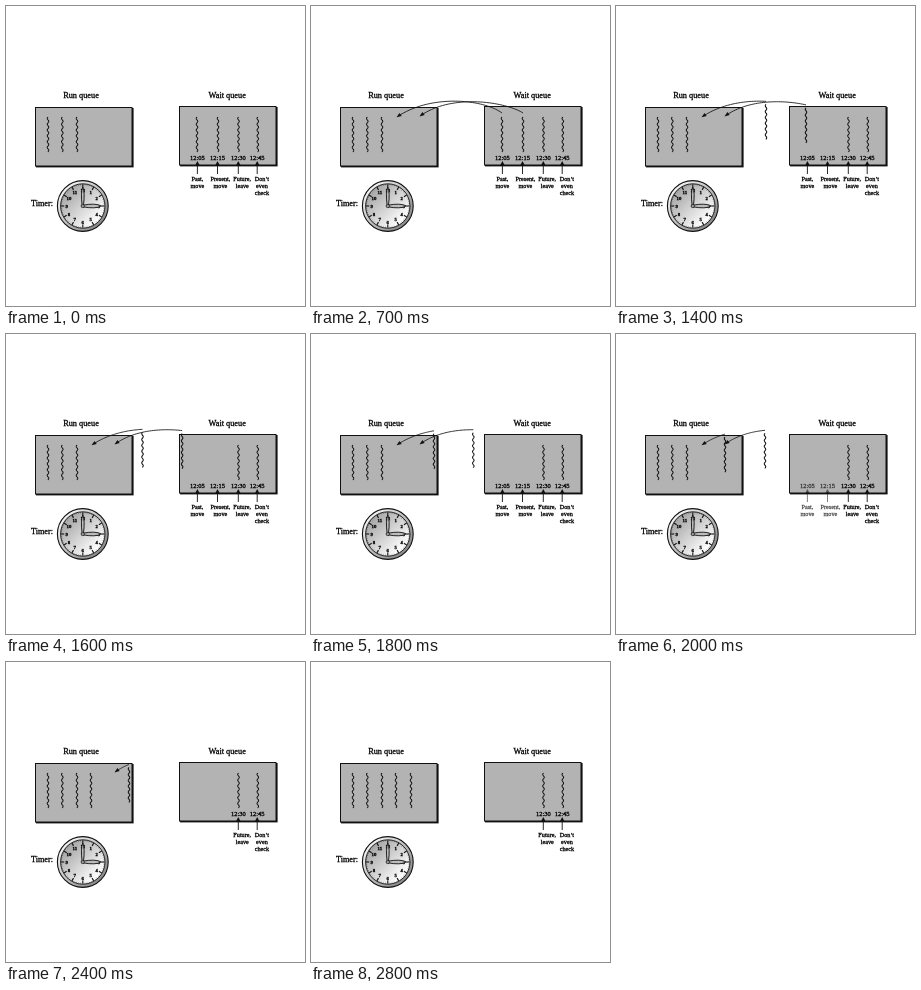
Write an HTML page with a canvas that moves like this. It is 299x300 px and loops after 3.4 s.

```html
<!DOCTYPE html>
<html lang="en">
<head>
<meta charset="utf-8">
<title>Run queue and wait queue</title>
<style>
html, body { margin: 0; width: 100%; height: 100%; overflow: hidden; background: #fff; }
canvas { display: block; width: 100vw; height: 100vh; }
</style>
</head>
<body>
<canvas id="stage" width="299" height="300"></canvas>
<script>
const ctx = document.getElementById('stage').getContext('2d');
const LOOP = 3400, START = 700, STEP = 100, LAST_STEP = 22;
const INK = '#111', REST_TOP = 111, THREAD_LENGTH = 35;

// Each key pairs a step with the thread's x position.
const movers = [
  {
    path: [[191, 107], [172, 93], [119, 88], [85.5, 111.3]],
    keys: [[1, 191], [4, 172.7], [8, 150], [12, 123], [14, 109], [18, 85]]
  },
  {
    path: [[212, 107], [195, 96], [140, 87], [108.5, 110.5]],
    keys: [[4, 212], [6, 203], [8, 190], [12, 162.3], [14, 149], [18, 123], [22, 100]]
  }
];

const slots = [
  { x: 191.4, labelX: 191.4, time: '12:05', lines: ['Past,', 'move'], fades: true },
  { x: 211.5, labelX: 214.4, time: '12:15', lines: ['Present,', 'move'], fades: true },
  { x: 232.3, labelX: 236.2, time: '12:30', lines: ['Future,', 'leave'] },
  { x: 251.2, labelX: 255.9, time: '12:45', lines: ['Don\u2019t', 'even', 'check'] }
];

const clamp01 = v => Math.max(0, Math.min(1, v));

function keyed(keys, step) {
  if (step <= keys[0][0]) return keys[0][1];
  for (let i = 1; i < keys.length; i++) {
    const [s0, x0] = keys[i - 1], [s1, x1] = keys[i];
    if (step <= s1) return x0 + (x1 - x0) * (step - s0) / (s1 - s0);
  }
  return keys[keys.length - 1][1];
}

function bezier(p, u) {
  const v = 1 - u;
  return [0, 1].map(i => v * v * v * p[0][i] + 3 * v * v * u * p[1][i] +
    3 * v * u * u * p[2][i] + u * u * u * p[3][i]);
}

// The paths run right to left, so x falls steadily along them.
function paramAtX(path, x) {
  let lo = 0, hi = 1;
  for (let i = 0; i < 24; i++) {
    const mid = (lo + hi) / 2;
    if (bezier(path, mid)[0] > x) lo = mid; else hi = mid;
  }
  return (lo + hi) / 2;
}

function text(str, x, y, size, weight = '') {
  ctx.font = `${weight} ${size}px "Liberation Serif", Times, serif`;
  ctx.textAlign = 'center';
  ctx.fillStyle = ctx.strokeStyle = '#000';
  ctx.lineWidth = 0.28;
  ctx.fillText(str, x, y);
  ctx.strokeText(str, x, y);
}

function line(x0, y0, x1, y1, width, color = INK) {
  ctx.strokeStyle = color;
  ctx.lineWidth = width;
  ctx.beginPath();
  ctx.moveTo(x0, y0);
  ctx.lineTo(x1, y1);
  ctx.stroke();
}

function disc(x, y, r, fill, width) {
  ctx.beginPath();
  ctx.arc(x, y, r, 0, Math.PI * 2);
  ctx.fillStyle = fill;
  ctx.fill();
  ctx.strokeStyle = INK;
  ctx.lineWidth = width;
  ctx.stroke();
}

function diagonal(x, y, r, from, to) {
  const g = ctx.createLinearGradient(x - r, y - r, x + r, y + r);
  g.addColorStop(0, from);
  g.addColorStop(1, to);
  return g;
}

function arrowHead(x, y, angle, length, half) {
  ctx.save();
  ctx.translate(x, y);
  ctx.rotate(angle);
  ctx.fillStyle = INK;
  ctx.beginPath();
  ctx.moveTo(0, 0);
  ctx.lineTo(-length, -half);
  ctx.lineTo(-length, half);
  ctx.fill();
  ctx.restore();
}

function thread(x, top = REST_TOP) {
  ctx.strokeStyle = INK;
  ctx.lineWidth = 1.05;
  ctx.beginPath();
  for (let d = 0; d <= THREAD_LENGTH; d += 0.5) {
    ctx.lineTo(x - Math.sin(d * Math.PI * 2 / 5.8) * 0.75, top + d);
  }
  ctx.stroke();
}

function queue(title, titleX, x, y) {
  text(title, titleX, 92.3, 8.3);
  ctx.fillStyle = INK;
  ctx.fillRect(x + 1, y + 1, 97.6, 59.4);
  ctx.fillStyle = '#b3b3b3';
  ctx.fillRect(x, y, 97, 59);
  ctx.strokeStyle = INK;
  ctx.lineWidth = 1;
  ctx.strokeRect(x + 0.5, y + 0.5, 96.5, 58.5);
}

function hand(x, y, angle, length, half) {
  ctx.save();
  ctx.translate(x, y);
  ctx.rotate(angle);
  ctx.beginPath();
  ctx.moveTo(0, -half * 0.5);
  ctx.quadraticCurveTo(length * 0.7, -half * 2, length, 0);
  ctx.quadraticCurveTo(length * 0.7, half * 2, 0, half * 0.5);
  ctx.closePath();
  ctx.fillStyle = '#bbb';
  ctx.fill();
  ctx.strokeStyle = INK;
  ctx.lineWidth = 0.9;
  ctx.stroke();
  ctx.restore();
}

function clock(x, y) {
  text('Timer:', 36, 200.3, 8.2);
  disc(x, y, 25.4, diagonal(x, y, 18, '#f4f4f4', '#888'), 1.1);
  disc(x, y, 22.2, diagonal(x, y, 15, '#a8a8a8', '#fff'), 0.9);
  for (let i = 0; i < 60; i++) {
    const a = i * Math.PI / 30, c = Math.cos(a), s = Math.sin(a);
    const inner = i % 5 ? 20.8 : 18.6;
    line(x + c * inner, y + s * inner, x + c * 21.8, y + s * 21.8, i % 5 ? 0.4 : 1.1);
  }
  for (let h = 1; h <= 12; h++) {
    const a = h * Math.PI / 6;
    text(h, x + Math.sin(a) * 16, y - Math.cos(a) * 16 + 1.6, 4.8, 'bold');
  }
  hand(x, y, -Math.PI / 2, 19, 1.2);
  hand(x, y, 0, 18.5, 1.6);
  disc(x, y, 1.7, '#999', 0.7);
}

function slotLabel(slot, alpha) {
  if (alpha <= 0) return;
  ctx.globalAlpha = alpha;
  text(slot.time, slot.x, 154.2, 6.5);
  line(slot.x, 168, slot.x, 158, 0.9);
  arrowHead(slot.x, 154.9, -Math.PI / 2, 4.2, 2.1);
  slot.lines.forEach((str, i) => text(str, slot.labelX, 174.7 + i * 7.2, 6.2));
  ctx.globalAlpha = 1;
}

function pathArrow(path, from) {
  const [tipX, tipY] = path[3];
  const angle = Math.atan2(tipY - path[2][1], tipX - path[2][0]);
  ctx.strokeStyle = INK;
  ctx.lineWidth = 0.85;
  ctx.beginPath();
  for (let i = 0; i <= 40; i++) {
    ctx.lineTo(...bezier(path, from + (0.98 - from) * i / 40));
  }
  ctx.stroke();
  arrowHead(tipX, tipY, angle, 5, 1.9);
}

function mover({ path, keys }, step) {
  const x = keyed(keys, step);
  const u = paramAtX(path, x);
  const moving = step > keys[0][0] && x > path[3][0];
  thread(x, moving ? Math.min(REST_TOP, bezier(path, u)[1] + 3) : REST_TOP);
  if (step > 0 && x > path[3][0]) pathArrow(path, u);
}

function draw(time) {
  const t = time % LOOP;
  const step = t < START ? 0 : Math.min(LAST_STEP, Math.floor((t - START) / STEP) + 1);
  const fade = clamp01(1 - (step - 12) / 5);

  ctx.fillStyle = '#fff';
  ctx.fillRect(0, 0, 299, 300);
  queue('Run queue', 75, 29, 101);
  queue('Wait queue', 221.2, 173, 100);
  clock(76.8, 200);
  slots.forEach(slot => slotLabel(slot, slot.fades ? fade : 1));
  [42, 56.3, 71, 232.5, 251.8].forEach(x => thread(x));
  movers.forEach(m => mover(m, step));
}

const origin = performance.now();
function tick() {
  draw(performance.now() - origin);
  requestAnimationFrame(tick);
}
tick();
</script>
</body>
</html>
```
